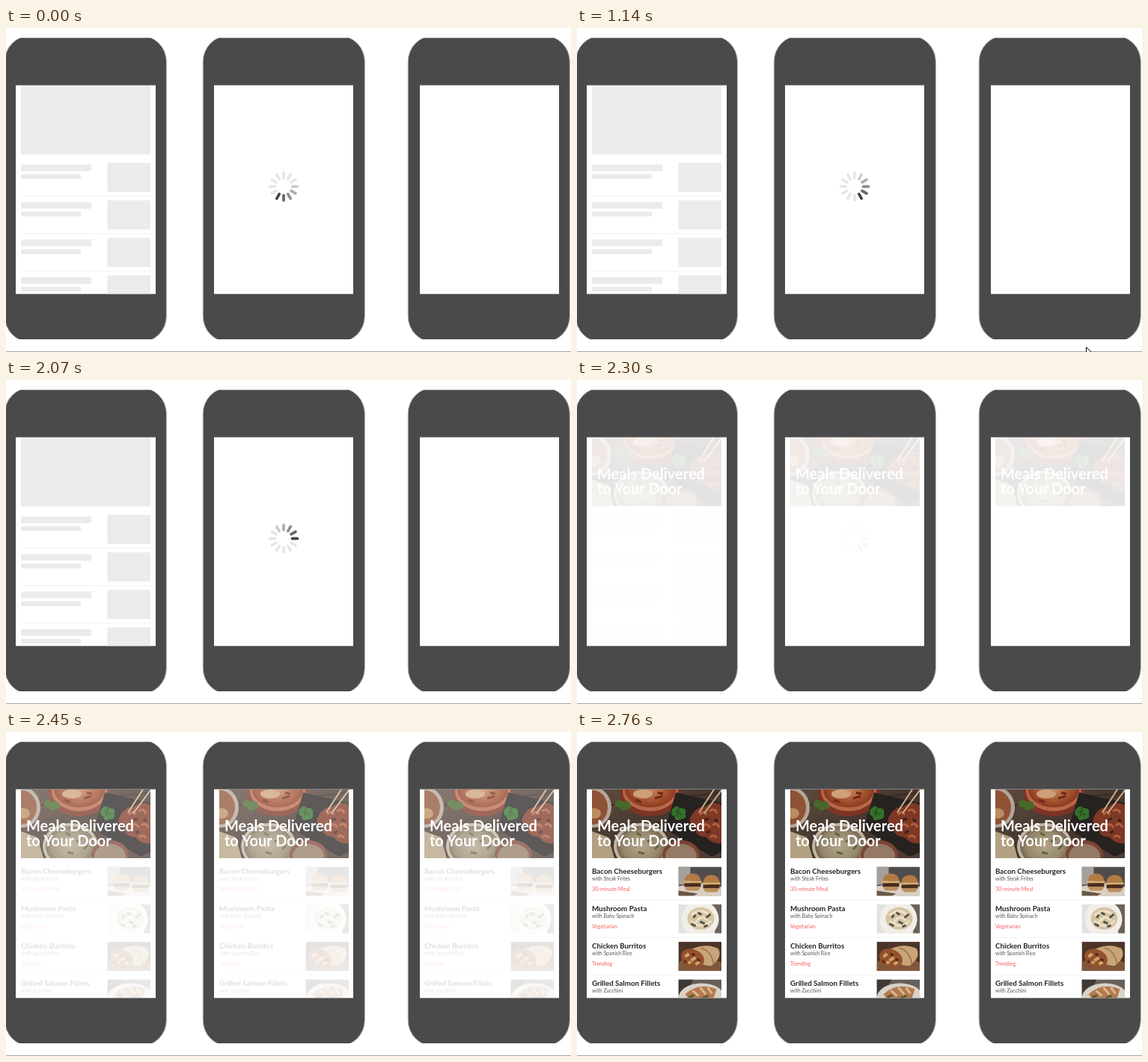
Animation, 755 px wide and 434 px high, one loop 3.62 s. Source, as an HTML page:

```html
<!DOCTYPE html>
<html lang="en">
<head>
<meta charset="utf-8">
<title>Loading styles</title>
<style>
  html, body { margin: 0; width: 100%; height: 100%; overflow: hidden; background: #fff; }
  #stage { display: block; width: 755px; height: 434px; }
  text { font-family: Lato, "Open Sans", sans-serif; }
  .headline { font-size: 20px; font-weight: 700; fill: #fff; }
  .title { font-size: 9.75px; font-weight: 700; fill: #222; }
  .sub { font-size: 7px; fill: #555; }
  .tag { font-size: 7.2px; fill: #f45f5c; }
  .bone { fill: #ebebeb; }
  .rule { fill: #f3f3f3; }
</style>
</head>
<body>
<svg id="stage" viewBox="0 0 755 434">
  <defs>
    <clipPath id="bodyClip"><rect x="-3" y="13.3" width="220" height="403.7"/></clipPath>
    <clipPath id="screenClip"><rect x="13" y="76.7" width="187" height="279.6"/></clipPath>
    <linearGradient id="wood" x2="1" y2="1">
      <stop offset="0" stop-color="#5f4c40"/><stop offset=".5" stop-color="#45362e"/><stop offset="1" stop-color="#4f3e35"/>
    </linearGradient>
    <radialGradient id="soup">
      <stop offset="0" stop-color="#c98a5c"/><stop offset=".65" stop-color="#a6522f"/><stop offset="1" stop-color="#8a3a20"/>
    </radialGradient>
    <radialGradient id="rice">
      <stop offset="0" stop-color="#b3a58b"/><stop offset=".75" stop-color="#95866c"/><stop offset="1" stop-color="#75654f"/>
    </radialGradient>

    <g id="phone" clip-path="url(#bodyClip)">
      <rect x="-1.8" y="10" width="216.2" height="411" rx="35" fill="#4a4a4a" stroke="#b4b4b4"/>
    </g>

    <g id="hero">
      <svg x="20" y="77" width="173" height="92">
        <rect width="173" height="92" fill="url(#wood)"/>
        <path d="M0 24L173 4M20 92L130 40M60 50L173 30" stroke="#352822" stroke-width="1.5"/>
        <ellipse cx="2" cy="24" rx="24" ry="27" fill="#b3a698"/>
        <ellipse cx="1" cy="24" rx="20" ry="23" fill="#8f5236"/>
        <ellipse cx="3" cy="32" rx="9" ry="7" fill="#b98d60"/>
        <path d="M0 56L22 64L30 92H0Z" fill="#b3a081"/>
        <ellipse cx="78" cy="4" rx="41" ry="32" fill="#7c3424"/>
        <ellipse cx="78" cy="2" rx="37" ry="27" fill="#b8674a"/>
        <ellipse cx="78" cy="0" rx="34" ry="24" fill="url(#soup)"/>
        <ellipse cx="68" cy="6" rx="13" ry="6" fill="#cda07a"/>
        <path d="M84 12l10-3M58 14l8 3M88 4l7 2" stroke="#6d2a18" stroke-width="3"/>
        <path d="M31 17q6-6 11 0q8-4 9 3q5 5-3 6q-8 5-11-2q-8 0-6-7z" fill="#47692c"/>
        <ellipse cx="66" cy="76" rx="37" ry="31" fill="#c0b5a3"/>
        <ellipse cx="66" cy="76" rx="33" ry="27" fill="url(#rice)"/>
        <path d="M48 68l7 3M60 58l6 4M74 70l7-4M62 84l8 2M84 80l5-5" stroke="#5f6a3a" stroke-width="3"/>
        <path d="M112 4L173 18V84L160 90L98 53Z" fill="#262220"/>
        <path d="M132 36q8-14 18-12q12-10 23-3v51q-12 2-20-8q-17-2-14-13q-12-4-7-15z" fill="#7d3826"/>
        <path d="M144 34q5-7 9 0M157 29q7-5 10 3M147 50q6-7 11 1M161 48q6-5 9 3M158 64q5-5 9 1" fill="none" stroke="#b35e3c" stroke-width="3"/>
        <path d="M150 41l6-2M164 40l4 3M153 58l5-2" stroke="#3d1f18" stroke-width="3"/>
        <path d="M107 27q6-8 11-2q9-1 7 7q2 8-7 8q-7 4-8-4q-6-2-3-9z" fill="#35702a"/>
        <path d="M112 29l8 5M116 24l-2 12" stroke="#265420" stroke-width="2"/>
        <ellipse cx="119" cy="88" rx="25" ry="20" fill="#7b4436"/>
        <ellipse cx="119" cy="89" rx="21" ry="16" fill="#947a64"/>
        <path d="M143 31L163 0M150 32L173 1" stroke="#cfb08c" stroke-width="2"/>
      </svg>
      <text class="headline" x="27" y="133">Meals Delivered</text>
      <text class="headline" x="27" y="153.4">to Your Door</text>
    </g>

    <g id="meals" clip-path="url(#screenClip)"></g>

    <g id="art0">
      <rect width="58" height="39" fill="#4f4d4b"/>
      <path d="M0 0H16V24H0Z" fill="#a5a09a"/>
      <path d="M0 26L30 22L58 27V39H0Z" fill="#d9cfc3"/>
      <path d="M0 32L26 36L20 39H0Z" fill="#6a5645"/>
      <g id="burger">
        <path d="M8 19q1-10 11-10t11 10z" fill="#b47a45"/>
        <path d="M7 19h24v3H7z" fill="#d8b070"/>
        <path d="M8 22h22v5H8z" fill="#4a2b1c"/>
        <path d="M9 27h20q0 5-5 5H14q-5 0-5-5z" fill="#bd8f5c"/>
      </g>
      <use href="#burger" x="25" y="2"/>
    </g>
    <g id="art1">
      <rect width="58" height="39" fill="#e2e1df"/>
      <path d="M44 0H58V39H49Z" fill="#6a6158"/>
      <circle cx="29" cy="20" r="25" fill="#f1eee9"/>
      <ellipse cx="30" cy="19" rx="18" ry="15" fill="#d6c4a4"/>
      <path d="M17 15q12-12 25 0M17 22q13 13 27 0M22 26q9-15 17-4" fill="none" stroke="#ece0c8" stroke-width="3"/>
      <path d="M17 26l6 3M26 11l5 3M37 18l6-5M29 23l6 3M20 18l3-4M34 30l5-2" stroke="#54544a" stroke-width="3"/>
    </g>
    <g id="art2">
      <rect width="58" height="39" fill="#4c3528"/>
      <path d="M0 27L30 15L58 28V39H0Z" fill="#81573a"/>
      <path d="M13 12Q35 0 53 9Q60 20 44 32Q26 33 13 12Z" fill="#c9a478"/>
      <path d="M30 8Q44 12 47 29" fill="none" stroke="#a47a50" stroke-width="2"/>
      <ellipse cx="19" cy="22" rx="16" ry="12" fill="#93512d" transform="rotate(24 19 22)"/>
      <path d="M9 20l5-4M17 25l6-4M23 30l5-3M13 28l4-1" stroke="#cfa56a" stroke-width="4"/>
      <path d="M18 16l4 2M25 23l4 2M8 25l2 3" stroke="#5e2217" stroke-width="3"/>
    </g>
    <g id="art3">
      <rect width="58" height="39" fill="#67605a"/>
      <path d="M0 0H20L8 22H0Z" fill="#3e3935"/>
      <ellipse cx="31" cy="25" rx="31" ry="20" fill="#d9d2c8"/>
      <path d="M9 20Q26 3 51 13L47 25H13Z" fill="#b27a4e"/>
      <path d="M19 15l8 7M29 11l8 9M39 11l6 8" stroke="#dcb88e" stroke-width="3"/>
      <path d="M14 24l7-3M32 25l8-3" stroke="#5c5a35" stroke-width="3"/>
    </g>
  </defs>

  <rect width="755" height="434" fill="#fff"/>
  <g id="phones"></g>
  <g id="skeleton" clip-path="url(#screenClip)"></g>
  <g id="spinner" transform="translate(371 212.4)" stroke-width="3.7" stroke-linecap="round"></g>
  <g id="content"></g>
  <rect y="433" width="755" height="1" fill="#a6a6a6"/>
  <path id="cursor" d="M0 0V17L4 13L6.7 19.2L9.4 18L6.7 12H12Z" fill="#fff" stroke="#000"/>
</svg>
<script>
  const $ = id => document.getElementById(id);
  const rect = (cls, x, y, w, h) => `<rect class="${cls}" x="${x}" y="${y}" width="${w}" height="${h}"/>`;
  const text = (cls, y, s) => `<text class="${cls}" x="20" y="${y}">${s}</text>`;

  const shifts = [0, 265, 539];
  const screens = [[13, 187], [278, 186], [553, 186]];
  const dishes = [
    ["Bacon Cheeseburgers", "with Steak Frites", "30-minute Meal"],
    ["Mushroom Pasta", "with Baby Spinach", "Vegetarian"],
    ["Chicken Burritos", "with Spanish Rice", "Trending"],
    ["Grilled Salmon Fillets", "with Zucchini", ""]
  ];

  $("phones").innerHTML = shifts.map((x, i) =>
    `<use href="#phone" x="${x}"/><rect x="${screens[i][0]}" y="76.7" width="${screens[i][1]}" height="279.6" fill="#fff"/>`).join("");

  $("skeleton").innerHTML = rect("bone", 20, 77, 173, 92.3) + dishes.map((d, i) => {
    const y = 180.5 + i * 50.3;
    return rect("bone", 20, y + 2.3, 94, 9) + rect("bone", 20, y + 15.2, 80, 6.4) +
      rect("bone", 135.5, y, 57.5, 39) + rect("rule", 20, y + 44, 173, 1.2);
  }).join("");

  $("meals").innerHTML = dishes.map(([name, side, tag], i) => {
    const y = 180.5 + i * 50.3, base = 190 + i * 50;
    return text("title", base, name) + text("sub", base + 9.3, side) + text("tag", base + 23.3, tag) +
      `<svg x="135.5" y="${y}" width="57.5" height="39"><use href="#art${i}"/></svg>` +
      rect("rule", 20, y + 44, 173, 1);
  }).join("");

  $("content").innerHTML = shifts.map(x => `<use href="#hero" x="${x}"/><use href="#meals" x="${x}"/>`).join("");

  $("spinner").innerHTML = Array.from({ length: 12 }, (_, i) =>
    `<path d="M0 -11.6V-18.4" transform="rotate(${i * 30})"/>`).join("");
  const spokes = [...$("spinner").children];
  const tail = ["#444", "#646464", "#8c8c8c", "#adadad", "#cdcdcd"];

  // Everything advances in ticks of about 77 ms.
  const LOOP = 3620, TICK = 76.9;
  const tickStart = k => Math.round((TICK * k - 7.5) / 10) * 10;
  const tickAt = t => {
    const k = Math.floor((t + 12.5) / TICK);
    return k > 0 && t < tickStart(k) ? k - 1 : k;
  };

  const fadeStart = 30;
  const heroFade = [.12, .43, .74, 1];
  const mealFade = [0, .02, .14, .41, .41, .74, 1];
  const fade = (list, k) => k < fadeStart ? 0 : list[Math.min(k - fadeStart, list.length - 1)];
  const fadeOut = (k, left) => k < fadeStart ? 1 : k === fadeStart ? left : 0;

  // tick, x, y
  const path = [[9, 667.5, 422.5], [10, 664.5, 440.5], [13, 664.5, 440.5], [14, 680.5, 427.5], [20, 750.5, 422.5]];
  function moveCursor(k) {
    const j = path.findIndex(p => p[0] >= k);
    const shown = k >= path[0][0] && j >= 0;
    $("cursor").style.display = shown ? "" : "none";
    if (!shown) return;
    const b = path[j], a = path[Math.max(j - 1, 0)];
    const u = a === b ? 0 : (k - a[0]) / (b[0] - a[0]);
    $("cursor").setAttribute("transform", `translate(${a[1] + (b[1] - a[1]) * u} ${a[2] + (b[2] - a[2]) * u})`);
  }

  function draw(t) {
    const k = tickAt(t);
    const head = 7 + Math.floor(k * .745 + .365);
    spokes.forEach((s, i) => s.setAttribute("stroke", tail[(head - i + 36) % 12] || "#e6e6e6"));
    $("spinner").setAttribute("opacity", fadeOut(k, .04));
    $("skeleton").setAttribute("opacity", fadeOut(k, .08));
    $("hero").setAttribute("opacity", fade(heroFade, k));
    $("meals").setAttribute("opacity", fade(mealFade, k));
    moveCursor(k);
  }

  const start = performance.now();
  function loop(now) {
    draw(Math.max(0, now - start) % LOOP);
    requestAnimationFrame(loop);
  }
  draw(0);
  requestAnimationFrame(loop);
</script>
</body>
</html>
```
